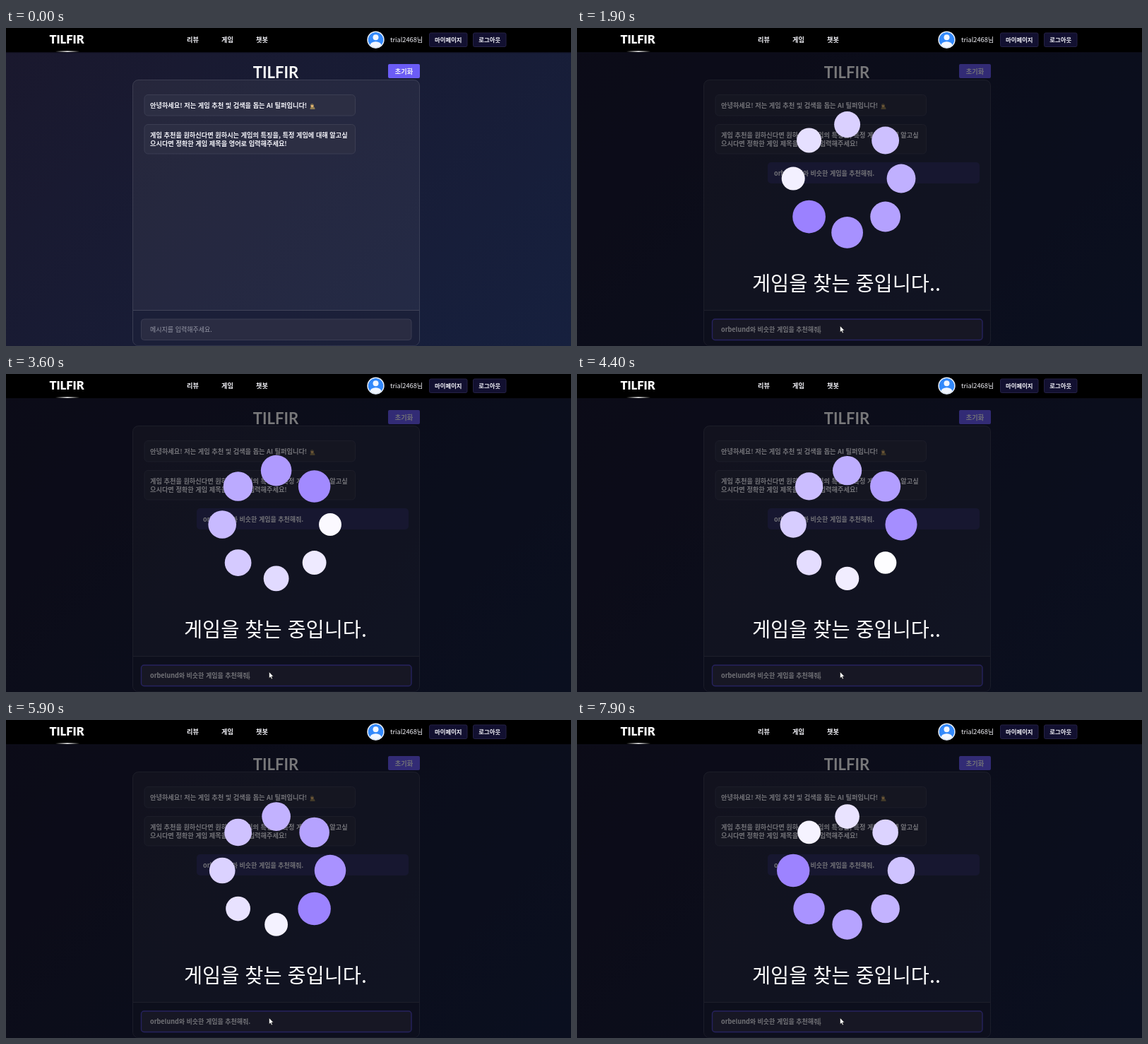
These frames come from a looping animation (800 by 450 pixels, 8000 ms). An HTML page:

```html
<!DOCTYPE html>
<html lang="ko">
<head>
<meta charset="utf-8">
<title>게임 추천 챗봇</title>
<style>
  html, body { margin: 0; width: 100%; height: 100%; overflow: hidden; background: #000; }
  svg { display: block; width: 800px; height: 450px; background: linear-gradient(135deg, #1a182d, #16203e); }
  text { font: 700 9.2px "Noto Sans CJK KR", "Noto Sans CJK JP", "Noto Sans CJK", sans-serif; fill: #f2f2f8; white-space: pre; }
  .mid { text-anchor: middle; }
  .small { font-size: 8.4px; }
  .brand { font-family: Lato, sans-serif; fill: #fff; }
  .bubble { fill: #2c2e43; stroke: #3b3d52; }
  .nav-btn { fill: #121030; stroke: #242145; }
  #field { fill: #2a2c42; stroke: #3a3c52; }
  #field.focus { fill: #303149; stroke: #5148c4; stroke-width: 1.4; }
  #entry, #question { font-size: 9px; }
  #entry.hint { font-weight: 500; fill: #9698a6; }
  #status { font-size: 28.4px; font-weight: 500; fill: #fff; }
</style>
</head>
<body>
<svg viewBox="0 0 800 450">
  <defs>
    <linearGradient id="glow">
      <stop offset="0" stop-color="#fff" stop-opacity="0"/>
      <stop offset=".5" stop-color="#fff"/>
      <stop offset="1" stop-color="#fff" stop-opacity="0"/>
    </linearGradient>
    <clipPath id="face"><circle cx="523.5" cy="16.7" r="10.8"/></clipPath>
  </defs>

  <!-- chat page -->
  <text class="brand mid" x="382" y="71" style="font-size:22px">TILFIR</text>
  <rect x="541" y="51" width="45" height="20" rx="2" fill="#6b5cf6"/>
  <text class="mid" x="563.5" y="64.600">초기화</text>

  <rect x="179.500" y="73.500" width="406" height="376" rx="8" fill="#fff" fill-opacity=".055" stroke="#fff" stroke-opacity=".13"/>
  <path d="M180 400H585V442a7.500 7.500 0 0 1-7.500 7.500H187.500A7.500 7.500 0 0 1 180 442Z" fill="#191d36" fill-opacity=".75"/>
  <path d="M180 399.500H585.500" stroke="#404358"/>

  <rect class="bubble" x="196" y="94.500" width="298.500" height="29.500" rx="5"/>
  <text x="204" y="113.200">안녕하세요! 저는 게임 추천 및 검색을 돕는 AI 틸퍼입니다!</text>
  <g>
    <path d="M430.500 115q0-4 3.500-4t3.500 4Z" fill="#8d7b52"/>
    <circle cx="433.500" cy="110" r="2.200" fill="#e3b56f"/>
    <path d="M430.500 109q3-4.500 5.500 0Z" fill="#6b6250"/>
  </g>
  <rect class="bubble" x="196" y="136.500" width="298.500" height="41.500" rx="5"/>
  <text x="204" y="154.800">게임 추천을 원하신다면 원하시는 게임의 특징을, 특정 게임에 대해 알고싶</text>
  <text x="204" y="166.800">으시다면 정확한 게임 제목을 영어로 입력해주세요!</text>
  <g id="asked">
    <rect x="270" y="190" width="300" height="30" rx="5" fill="#313163"/>
    <text id="question" x="279" y="208.700"></text>
  </g>

  <rect id="field" x="191.500" y="412" width="382.500" height="29.500" rx="4"/>
  <text id="entry" x="204" y="430.300"></text>
  <path id="caret" d="M344 421.500V432.500" stroke="#eee"/>

  <rect id="shade" y="34" width="800" height="416" fill="#000005" fill-opacity=".53"/>

  <!-- header -->
  <rect width="800" height="34.500" fill="#000"/>
  <path d="M0 35H800" stroke="#111124" stroke-opacity=".6"/>
  <text class="brand mid" x="86" y="21.500" style="font-size:16.500px;font-weight:900">TILFIR</text>
  <rect x="70" y="32.500" width="34" height="1.500" fill="url(#glow)"/>
  <text class="mid" x="264.500" y="20.300">리뷰</text>
  <text class="mid" x="313.500" y="20.300">게임</text>
  <text class="mid" x="362.500" y="20.300">챗봇</text>
  <circle cx="523.500" cy="16.700" r="12.200" fill="#e4eaf6"/>
  <g clip-path="url(#face)">
    <circle cx="523.500" cy="16.700" r="10.800" fill="#3389fb"/>
    <circle cx="523.500" cy="13.200" r="4" fill="#f2f6ff"/>
    <ellipse cx="523.500" cy="24.700" rx="8" ry="5.500" fill="#f2f6ff"/>
  </g>
  <text x="544" y="20.300" style="font-weight:500">trial2468님</text>
  <rect class="nav-btn" x="599.500" y="7" width="53.500" height="19.500" rx="2"/>
  <text class="mid small" x="626.300" y="20">마이페이지</text>
  <rect class="nav-btn" x="661.500" y="7" width="46.500" height="19.500" rx="2"/>
  <text class="mid small" x="684.700" y="20">로그아웃</text>

  <!-- loader -->
  <g id="loader">
    <g id="dots"></g>
    <text id="status" x="244" y="371.500"></text>
  </g>

  <path id="beam" d="M371 418.500h1.500l.8.700.8-.7h1.500M373.300 419v7M371 426.500h1.500l.8-.700.8.700h1.500" fill="none" stroke="#d8d8e0" stroke-width=".9"/>
  <path id="arrow" d="M372.500 421.500v9l2-1.800 1.400 3 1.500-.700-1.400-2.900h2.700Z" fill="#fff" stroke="#000" stroke-width=".5"/>
</svg>

<script>
  const LOOP = 8000, STEP = 100;      // ms
  const FOCUS = 100, TYPED = 700, SENT = 900;
  const SPIN = 371.6, BLINK = 420, ELLIPSIS = 600;
  const QUESTION = "orbelund와 비슷한 게임을 추천해줘.";
  const HEAD = [154, 128, 255];

  const $ = id => document.getElementById(id);
  const frac = v => v - Math.floor(v);
  const show = (id, on) => $(id).style.display = on ? "" : "none";

  // Eight dots on a ring, clockwise from the top
  const dots = Array.from({ length: 8 }, (_, i) => {
    const dot = document.createElementNS("http://www.w3.org/2000/svg", "circle");
    const angle = i * Math.PI / 4;
    dot.setAttribute("cx", 382.6 + 76.4 * Math.sin(angle));
    dot.setAttribute("cy", 213 - 76.4 * Math.cos(angle));
    $("dots").append(dot);
    return dot;
  });
  $("question").textContent = QUESTION;

  function drawLoader(t) {
    const turn = 0.631 + (t - 1900) / SPIN;
    dots.forEach((dot, i) => {
      const age = frac(turn - i / 8);
      const rgb = HEAD.map(c => Math.round(c + (255 - c) * age));
      dot.setAttribute("r", 23.4 - 7.8 * age);
      dot.setAttribute("fill", `rgb(${rgb})`);
    });
    const count = 1 + Math.floor(3 * frac((t - 450) / ELLIPSIS));
    $("status").textContent = "게임을 찾는 중입니다" + ".".repeat(count);
    $("status").setAttribute("x", 256 - 4 * count);
  }

  function draw(t) {
    const sent = t >= SENT, focused = t >= FOCUS;
    const part = Math.min(1, Math.max(0, (t - FOCUS) / (TYPED - FOCUS)));
    const typed = QUESTION.slice(0, Math.round(part * QUESTION.length));

    $("entry").textContent = typed || "메시지를 입력해주세요.";
    $("entry").classList.toggle("hint", !typed);
    $("field").classList.toggle("focus", focused);
    for (const id of ["asked", "shade", "loader", "arrow"]) show(id, sent);
    show("beam", focused && !sent);
    show("caret", sent && frac((t - 1858) / BLINK) < 0.5);
    if (sent) drawLoader(t);
  }

  function tick(now) {
    draw(Math.floor((now + 15) / STEP) * STEP % LOOP);
    requestAnimationFrame(tick);
  }
  draw(0);
  requestAnimationFrame(tick);
</script>
</body>
</html>
```
